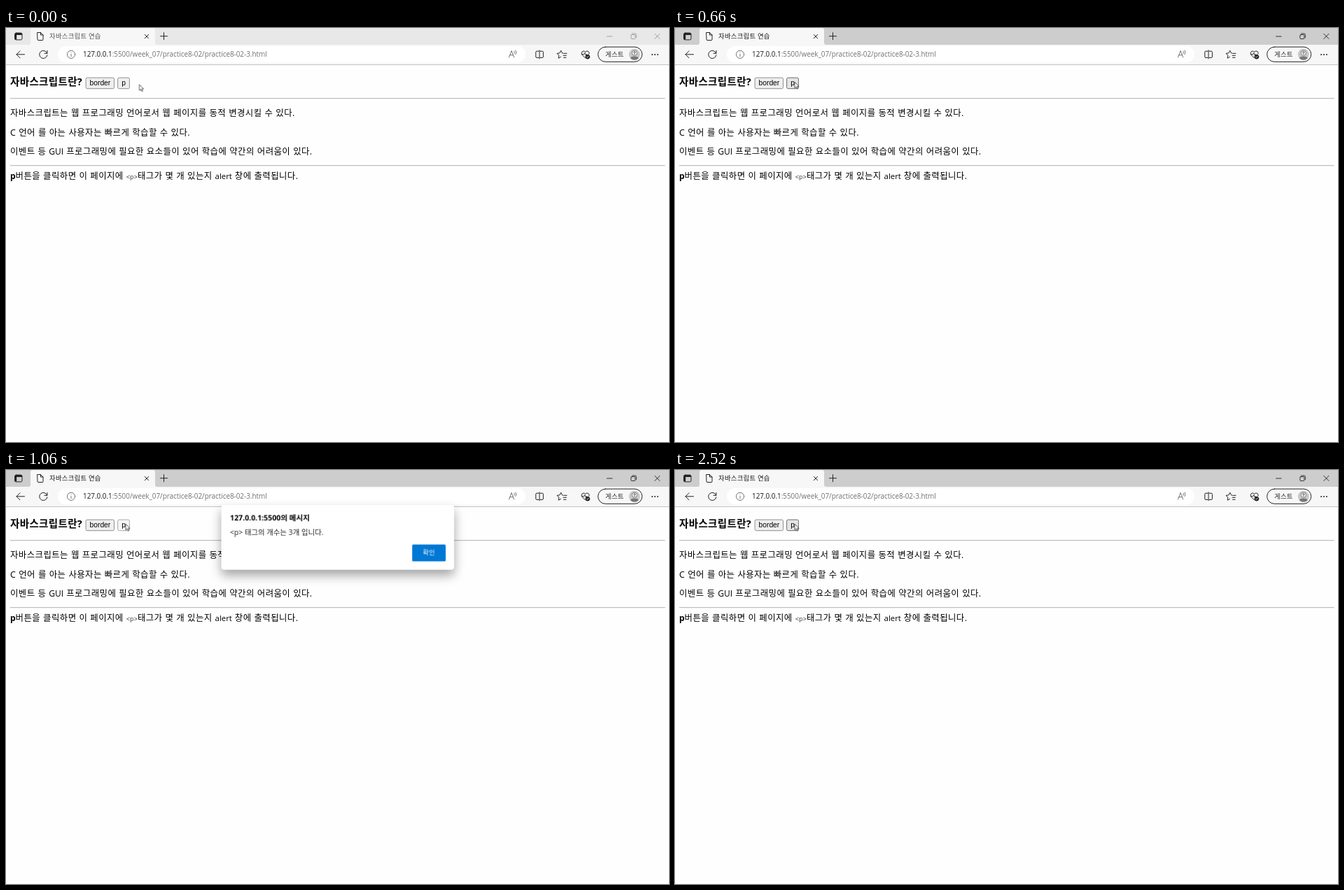
Recreate the animation shown at these times as an HTML page. Size 947 by 592 pixels, loop 3520 ms.

```html
<!DOCTYPE html>
<html lang="ko">
<head>
<meta charset="utf-8">
<title>자바스크립트 연습</title>
<style>
  html, body { margin: 0; width: 100%; height: 100%; overflow: hidden; background: #fefefe; }
  svg { display: block; width: 947px; height: 592px; }
  text { font-family: "Open Sans", "Noto Sans CJK KR", "Noto Sans CJK", sans-serif; white-space: pre; }
  .line { fill: none; stroke: #222; stroke-width: 1; stroke-linecap: round; stroke-linejoin: round; }
  .heading { font-size: 14.5px; font-weight: 700; letter-spacing: .35px; }
  .body { font-size: 12.4px; letter-spacing: .45px; word-spacing: .3px; }
  .latin { font-size: 12px; letter-spacing: 0; }
  .code { font: 9px "Liberation Mono", monospace; letter-spacing: 0; fill: #444; }
  .ui { font-size: 9.4px; letter-spacing: .25px; }
  .btn rect { fill: #efefef; stroke: #858585; stroke-width: .9; }
  .btn text { font: 10.26px "Liberation Sans", Arial, sans-serif; }
  .panel { filter: drop-shadow(0 8px 8px rgba(0, 0, 0, .36)); }

  .bar, .title, .controls, .cursor, .press rect, .dialog { animation: 3520ms step-end infinite; }
  .bar { animation-name: bar; }
  .title { animation-name: title; }
  .controls { animation-name: controls; }
  .cursor { animation-name: cursor; }
  .press rect { animation-name: press; }
  .dialog { animation-name: dialog; transform-origin: 474px 50px; }

  @keyframes bar { 0% { fill: #e8e8e8; } 1.98%, 100% { fill: #cdcdcd; } }
  @keyframes title { 0% { fill: #555; } 1.98%, 100% { fill: #1a1a1a; } }
  @keyframes controls { 0% { stroke: #999; } 1.98%, 100% { stroke: #222; } }
  @keyframes cursor {
    0% { transform: translate(190.5px, 80.8px); }
    11.07% { transform: translate(188.5px, 80.4px); }
    12.99% { transform: translate(183px, 79.2px); }
    14.91% { transform: translate(177px, 78.2px); }
    16.82% { transform: translate(172.5px, 77.4px); }
    18.74%, 100% { transform: translate(171px, 77.2px); }
  }
  @keyframes press {
    0% { fill: #efefef; stroke: #858585; }
    16.82% { fill: #e5e5e5; stroke: #5e5e5e; }
    22.72% { fill: #f5f5f5; stroke: #a2a2a2; }
    65.9%, 100% { fill: #e5e5e5; stroke: #5e5e5e; }
  }
  @keyframes dialog {
    0% { opacity: 0; transform: none; }
    24.57% { opacity: .08; transform: translateY(-11px) scale(1.009); }
    26.42% { opacity: .36; transform: translateY(-9px) scale(1.005); }
    28.26% { opacity: .85; transform: translateY(-4.5px) scale(1.002); }
    30.11% { opacity: 1; transform: none; }
    65.9% { opacity: .975; transform: translateY(-3.3px) scale(1.001); }
    67.8% { opacity: .65; transform: translateY(-7px) scale(1.008); }
    69.69% { opacity: .18; transform: translateY(-10px) scale(1.02); }
    71.59%, 100% { opacity: 0; transform: none; }
  }
</style>
</head>
<body>
<svg viewBox="0 0 947 592">
  <rect width="947" height="592" fill="#fefefe"/>

  <!-- tab strip -->
  <rect class="bar" width="947" height="24"/>
  <path d="M32 24q3 0 3-3V3q0-3 3-3H210q3 0 3 3V21q0 3 3 3z" fill="#f7f7f7"/>
  <rect class="line" x="12.6" y="7.1" width="10.4" height="9.8" rx="1.8"/>
  <path d="M12.6 10V9q0-2 2-2h6.4q2 0 2 2v1zM12.6 9h2.6v7.6h-2.6z" fill="#222"/>
  <path class="line" d="M45 6.5h4.5l3.5 3.5v6.5q0 1-1 1h-6q-1 0-1-1zM49.5 6.5V10H53"/>
  <text class="ui title" x="62" y="14.7">자바스크립트 연습</text>
  <path class="line" d="M198.2 9.4l5.4 5.4m0-5.4l-5.4 5.4M220.5 11.7h10m-5-5v10"/>
  <g class="line controls" style="stroke-width:.9">
    <path d="M858.5 12h7.5M926.7 8.3l7.2 7.2m0-7.2l-7.2 7.2"/>
    <rect x="892.8" y="9.5" width="6" height="6" rx="1"/>
    <path d="M894.6 8h4q1.7 0 1.7 1.7v4"/>
  </g>

  <!-- toolbar -->
  <rect y="24" width="947" height="28" fill="#f7f7f7"/>
  <rect y="52" width="947" height="1" fill="#c4c4c4"/>
  <rect x="74" y="26" width="668" height="23.5" rx="11.75" fill="#fff"/>
  <path class="line" d="M26.5 37.8H15m5-5l-5 5 5 5"/>
  <path class="line" d="M58.7 36.2a5.6 5.6 0 1 0 .2 2.6M58.9 32.4v3.9h-3.9"/>
  <g class="line" style="stroke:#666;stroke-width:.9">
    <circle cx="93" cy="37.8" r="5.6"/>
    <path d="M93 37.4v3.2M93 35.1v.1"/>
    <path d="M718.5 42l3.6-9.5 3.6 9.5m-1.2-3.3h-4.8M726 33.2q1.2 1.6 0 3.2M728 32q2 2.8 0 5.6"/>
  </g>
  <text x="110" y="41.2" font-size="9.87" fill="#707070"><tspan fill="#1a1a1a">127.0.0.1</tspan>:5500/week_07/practice8-02/practice8-02-3.html</text>
  <g class="line">
    <path d="M761 33.2h-3q-1.2 0-1.2 1.2v6.8q0 1.2 1.2 1.2h3M763 33.2h3.2q1.2 0 1.2 1.2v6.8q0 1.2-1.2 1.2H763M762 31.8v12"/>
    <path d="M796 36.2l-1.6-.4-1.7-3.6-1.8 3.6-3.9.6 2.8 2.8-.7 4 3.4-1.9M797 36.3h4M796 39.3h4.4M796.5 42.3h3.5"/>
    <path d="M827.5 43l-4.4-4.4q-2.2-2.9.2-5.1 2.2-1.5 4.2.8 2-2.3 4.3-.8 2 1.7 1 3.8M822.5 37.8h3l1.3-2.2 1.6 3.6 1.1-1.6"/>
    <circle cx="830.8" cy="41.2" r="2.9" fill="#222"/>
    <path d="M829.5 41.2l1 1 1.6-1.8" style="stroke:#fff;stroke-width:.8"/>
    <rect x="845.6" y="27.1" width="63" height="21.2" rx="10.6" fill="#f7f7f7"/>
  </g>
  <text class="ui" x="856" y="41" fill="#222">게스트</text>
  <circle cx="897.7" cy="37.8" r="8" fill="#c9c9c9"/>
  <path d="M892 43.4q0-3 5.7-3t5.7 3a8 8 0 0 1-11.4 0z" fill="#777"/>
  <circle cx="897.7" cy="35.7" r="3.7" fill="#eee" stroke="#777" stroke-width=".9"/>
  <path class="line" style="stroke-width:.8" d="M896.6 34.9q.1-1.1 1.1-1.1t1.1 1-1.1 1.5M897.7 37.5v.1"/>
  <g fill="#222"><circle cx="923" cy="38" r="1"/><circle cx="926.9" cy="38" r="1"/><circle cx="930.8" cy="38" r="1"/></g>

  <!-- page -->
  <text class="heading" x="6" y="81.8">자바스크립트란?</text>
  <g class="btn">
    <rect x="114.1" y="71.1" width="40.4" height="15.6" rx="2"/>
    <text x="119.6" y="82.2">border</text>
  </g>
  <g class="btn press">
    <rect x="159.6" y="71.1" width="16.8" height="15.6" rx="2"/>
    <text x="165.2" y="82.2">p</text>
  </g>
  <g fill="#bdbdbd"><rect x="6" y="100" width="935.5" height="1.2"/><rect x="6" y="196" width="935.5" height="1.2"/></g>
  <g class="body">
    <text x="6" y="125.8">자바스크립트는 웹 프로그래밍 언어로서 웹 페이지를 동적 변경시킬 수 있다.</text>
    <text x="6" y="153.6">C 언어 를 아는 사용자는 빠르게 학습할 수 있다.</text>
    <text x="6" y="181.4">이벤트 등 <tspan class="latin">GUI</tspan> 프로그래밍에 필요한 요소들이 있어 학습에 약간의 어려움이 있다.</text>
    <text x="6" y="216"><tspan class="latin" font-weight="700">p</tspan>버튼을 클릭하면 이 페이지에 <tspan class="code">&lt;p&gt;</tspan>태그가 몇 개 있는지 <tspan class="latin" style="font-size:11.4px">alert</tspan> 창에 출력됩니다.</text>
  </g>

  <g class="dialog">
    <rect class="panel" x="307.5" y="50" width="332.5" height="92.5" rx="4" fill="#fff"/>
    <text x="320" y="72" font-size="10.56" font-weight="700">127.0.0.1:5500의 메시지</text>
    <text x="320" y="92.6" font-size="10.4" fill="#222">&lt;p&gt; 태그의 개수는 3개 입니다.</text>
    <rect x="580.2" y="106.6" width="47.8" height="24" rx="1.5" fill="#0078d4"/>
    <text class="ui" x="604.2" y="121.5" text-anchor="middle" fill="#fff">확인</text>
  </g>

  <path class="cursor" d="M0 0V8.6L2 6.8 3.4 9.9 4.8 9.3 3.4 6.3H6.1z" fill="#fff" stroke="#333" stroke-width=".8" stroke-linejoin="round"/>
</svg>
</body>
</html>
```
